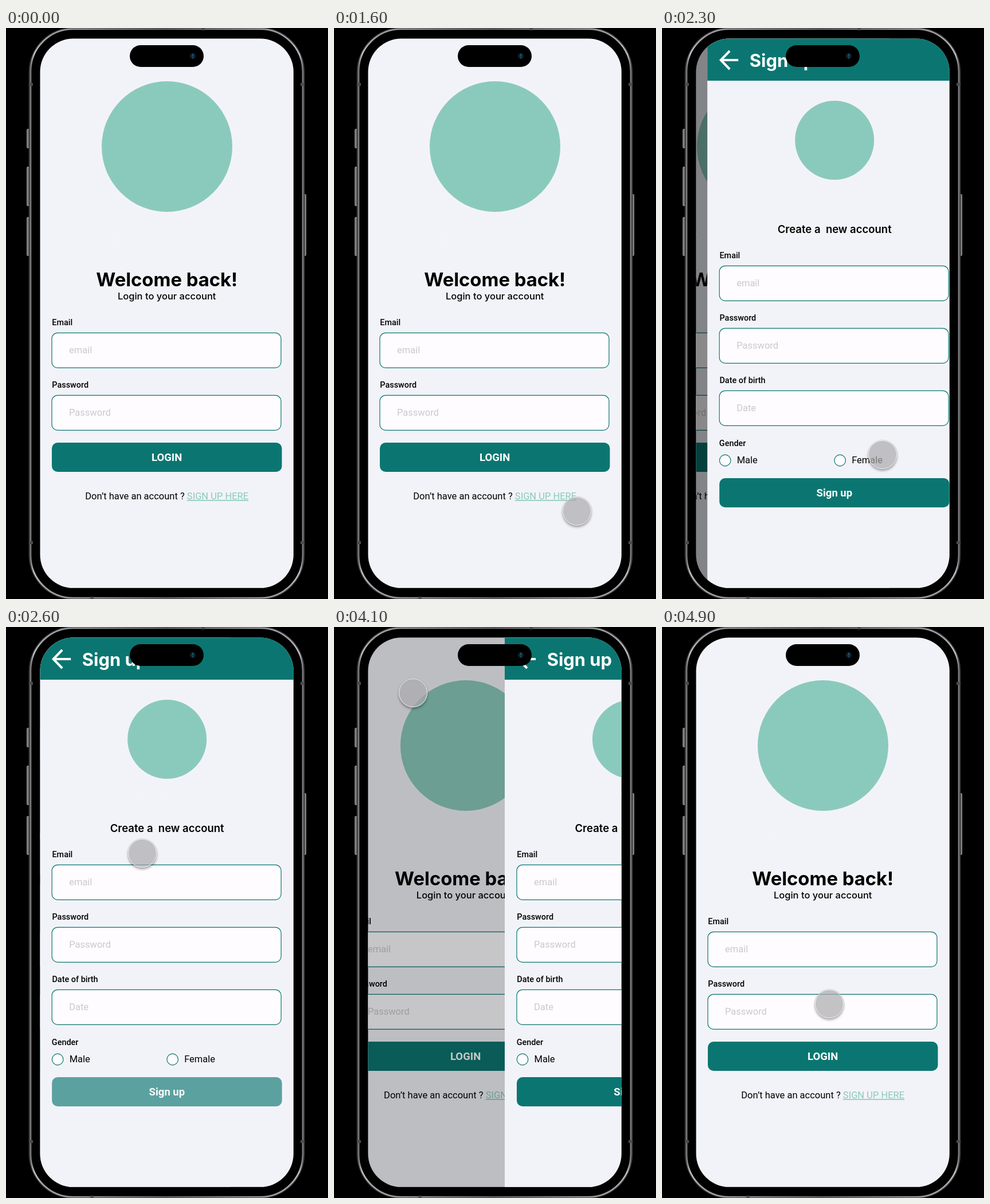
These frames come from a looping animation (562x997 px, 5000 ms). An HTML page:

```html
<!DOCTYPE html>
<html lang="en">
<head>
<meta charset="utf-8">
<title>Login and sign up</title>
<style>
  html, body { margin: 0; width: 100%; height: 100%; overflow: hidden; background: #000; }
  svg { display: block; width: 100%; height: 100%; }
  text { font-family: Roboto, sans-serif; font-size: 16.5px; white-space: pre; }
  .inter { font-family: Inter, sans-serif; }
  .title { font-size: 32.8px; font-weight: 700; }
  .bar { font-size: 30.9px; font-weight: 700; fill: #fff; }
  .sub { font-weight: 500; }
  .head { font-size: 18.5px; font-weight: 600; }
  .label { font-size: 14.4px; font-weight: 500; }
  .hint { fill: #cbc9ce; }
  .btn { font-size: 18.5px; font-weight: 700; fill: #fff; }
  .mid { text-anchor: middle; }
  .link { fill: #8acabc; text-decoration: underline; }
  .faint { font-family: "Noto Serif", serif; fill: #eff4f9; }
</style>
</head>
<body>
<svg viewBox="0 0 562 997">
  <defs>
    <clipPath id="glass"><rect x="59.5" y="18.5" width="442.3" height="959.3" rx="58"/></clipPath>
    <linearGradient id="metal" x1="0" x2="1" y1="0" y2="0">
      <stop offset="0" stop-color="#77777a"/>
      <stop offset=".012" stop-color="#c2c2c5"/>
      <stop offset=".05" stop-color="#a6a6a9"/>
      <stop offset=".5" stop-color="#606063"/>
      <stop offset=".95" stop-color="#a6a6a9"/>
      <stop offset=".988" stop-color="#c2c2c5"/>
      <stop offset="1" stop-color="#77777a"/>
    </linearGradient>
    <radialGradient id="lens">
      <stop offset="0" stop-color="#174a66"/>
      <stop offset=".5" stop-color="#0b2432"/>
      <stop offset="1" stop-color="#05080c"/>
    </radialGradient>
    <filter id="soft" x="-50%" y="-50%" width="200%" height="200%"><feGaussianBlur stdDeviation="2"/></filter>
    <mask id="rim" maskUnits="userSpaceOnUse" x="-40" y="-40" width="80" height="80">
      <rect x="-40" y="-40" width="80" height="80" fill="#fff"/>
      <circle r="25" fill="#000"/>
    </mask>
  </defs>

  <rect width="562" height="997"/>
  <g id="keys"></g>
  <rect x="42.2" y="1.5" width="476.6" height="994" rx="75" stroke="#3c3c3f" stroke-width="5"/>
  <rect x="43" y="2" width="475" height="993" rx="74" stroke="url(#metal)" stroke-width="2.6"/>
  <g id="bands" fill="#4b4b4e"></g>

  <g clip-path="url(#glass)">
    <g id="login"></g>
    <rect id="dim" x="59" y="18" width="444" height="961"/>
    <g id="signup"></g>
  </g>

  <rect x="216" y="30" width="129" height="38" rx="19"/>
  <circle cx="326" cy="49" r="6" fill="url(#lens)"/>
  <circle cx="326" cy="46.5" r="1.2" fill="#2a6c86"/>
  <circle cx="326" cy="52" r="1.2" fill="#1b5068"/>

  <g id="touch">
    <g mask="url(#rim)"><circle cy="3" r="25" opacity=".35" filter="url(#soft)"/></g>
    <circle r="25" fill="#acacae" fill-opacity=".7"/>
    <circle r="25.4" fill="none" stroke="#8f8f92" stroke-opacity=".45" stroke-width=".8"/>
    <circle r="24.6" fill="none" stroke="#fff" stroke-opacity=".8"/>
  </g>
  <path id="hand" transform="translate(104 27)" fill="#fff" stroke="#000" stroke-width=".9" stroke-linejoin="round"
    d="M3.6 11V2.2Q3.6.7 4.9.7T6.2 2.2V7.3Q7.5 6.4 8.6 7.7 9.9 7 10.8 8.4 12.5 8 12.5 10V13.2Q12.5 15.4 11.3 17.2V19H4.9V17.4Q3 15 .9 11.8 .2 10.2 1.5 9.9 2.6 9.8 3.6 11ZM6.2 7.3V11M8.6 7.7V11M10.8 8.4V11.3"/>
</svg>

<script>
const TEAL = '#0b7671', MINT = '#8acabc', PAPER = '#f2f3f8';
const LOOP = 5000, STEP = 100, WIDTH = 443, PARALLAX = 111;
const $ = id => document.getElementById(id);

const text = (x, y, cls, str) => `<text x="${x}" y="${y}" class="${cls}">${str}</text>`;
const rect = (x, y, w, h, attrs) => `<rect x="${x}" y="${y}" width="${w}" height="${h}" ${attrs}/>`;
const field = (y, label, hint) =>
  text(80.3, y - 13, 'label', label) +
  rect(80, y + .3, 400, 61, `rx="10" fill="#fefcff" stroke="${TEAL}" stroke-width="1.2"`) +
  text(110, y + 36, 'hint', hint);
const button = (id, y, label) =>
  `<g id="${id}">` + rect(80, y, 401.5, 51, `rx="10" fill="${TEAL}"`) +
  text(280.7, y + 31.7, 'btn mid', label) + '</g>';
const radio = (x, label) =>
  `<circle cx="${x}" cy="755" r="9.8" fill="#fefcff" stroke="${TEAL}" stroke-width="1.2"/>` +
  text(x + 20.5, 760, '', label);
const emblem = (cy, r) => `<circle cx="281" cy="${cy}" r="${r}" fill="${MINT}"/>`;
const wordmark = (x, y, size) =>
  `<text x="${x}" y="${y}" class="faint mid" style="font-size:${size}px">Savings Ledger</text>`;
const sheet = rect(59, 18, 444, 961, `fill="${PAPER}"`);

$('login').innerHTML = sheet + emblem(207, 114) + wordmark(280, 384, 46) +
  text(280.7, 451.3, 'inter title mid', 'Welcome back!') +
  text(280.7, 474, 'inter sub mid', 'Login to your account') +
  field(532, 'Email', 'email') +
  field(641, 'Password', 'Password') +
  button('enter', 724, 'LOGIN') +
  text(280.7, 823, 'mid', 'Don’t have an account ? <tspan class="link">SIGN UP HERE</tspan>');

$('signup').innerHTML = sheet +
  rect(59, 18, 444, 74, `fill="${TEAL}"`) +
  '<path d="M113 56H83M98 40 82.5 56 98 72" fill="none" stroke="#fff" stroke-width="4"/>' +
  text(132.7, 67.5, 'inter bar', 'Sign up') +
  emblem(196, 69) + wordmark(295, 304, 26) +
  text(281, 357.6, 'inter head mid', 'Create a\u00a0 new account') +
  field(415, 'Email', 'email') +
  field(524, 'Password', 'Password') +
  field(633, 'Date of birth', 'Date') +
  text(79.7, 730, 'label', 'Gender') +
  radio(90, 'Male') + radio(290.5, 'Female') +
  button('send', 786, 'Sign up');

$('keys').innerHTML = [[36, 176, 34], [36, 242, 69], [36, 330, 68], [519, 290, 108]]
  .map(([x, y, h]) => rect(x + .5, y + .5, 4, h - 1, 'rx="1.5" fill="#77777a" stroke="#a9a9ac" stroke-width=".8"'))
  .join('');
$('bands').innerHTML =
  [[40, 96], [40, 896], [514, 96], [514, 896]].map(([x, y]) => rect(x, y, 7, 5, '')).join('') +
  rect(341, 0, 6, 4, '') + rect(147, 993, 6, 4, '');

// Keys are [time, value, value, ...]; values run straight between them.
function track(keys, t) {
  if (t <= keys[0][0]) return keys[0].slice(1);
  for (let i = 1; i < keys.length; i++) {
    const [a, b] = [keys[i - 1], keys[i]];
    if (t < b[0]) {
      const k = (t - a[0]) / (b[0] - a[0]);
      return a.slice(1).map((v, j) => v + (b[j + 1] - v) * k);
    }
  }
  return keys[keys.length - 1].slice(1);
}

// Critically damped spring from 0 to 1, as in a phone's page transition.
function spring(ms) {
  const x = Math.max(0, ms) * .01826;
  return 1 - Math.exp(-x) * (1 + x);
}

const touchPath = [
  [1000, 494, 690], [1300, 452, 800], [1500, 424, 843], [1900, 424, 845], [2100, 423, 852],
  [2300, 385, 745], [2600, 238, 395], [2700, 158, 165], [2800, 110, 45],
  [3800, 110, 45], [3900, 113, 55], [4100, 138, 115], [4400, 205, 320], [4900, 292, 658]
];
const sendFade = [[2400, 1], [2600, .65], [2700, .65], [2900, 1]];

function draw(t) {
  const p = spring(t - 2034) - spring(t - 4001);
  $('login').setAttribute('transform', `translate(${-PARALLAX * p} 0)`);
  $('dim').setAttribute('opacity', .48 * p);
  $('signup').setAttribute('transform', `translate(${WIDTH * (1 - p)} 0)`);
  $('send').setAttribute('opacity', track(sendFade, t)[0]);

  const hovering = t >= 2900 && t < 3800;
  const [x, y] = track(touchPath, t);
  $('touch').setAttribute('transform', `translate(${x} ${y})`);
  $('touch').setAttribute('visibility', t >= 1000 && !hovering ? 'visible' : 'hidden');
  $('hand').setAttribute('visibility', hovering ? 'visible' : 'hidden');
}

const start = performance.now();
function tick() {
  const t = (performance.now() - start) % LOOP;
  draw(Math.floor(t / STEP) * STEP);
  requestAnimationFrame(tick);
}
tick();
</script>
</body>
</html>
```
